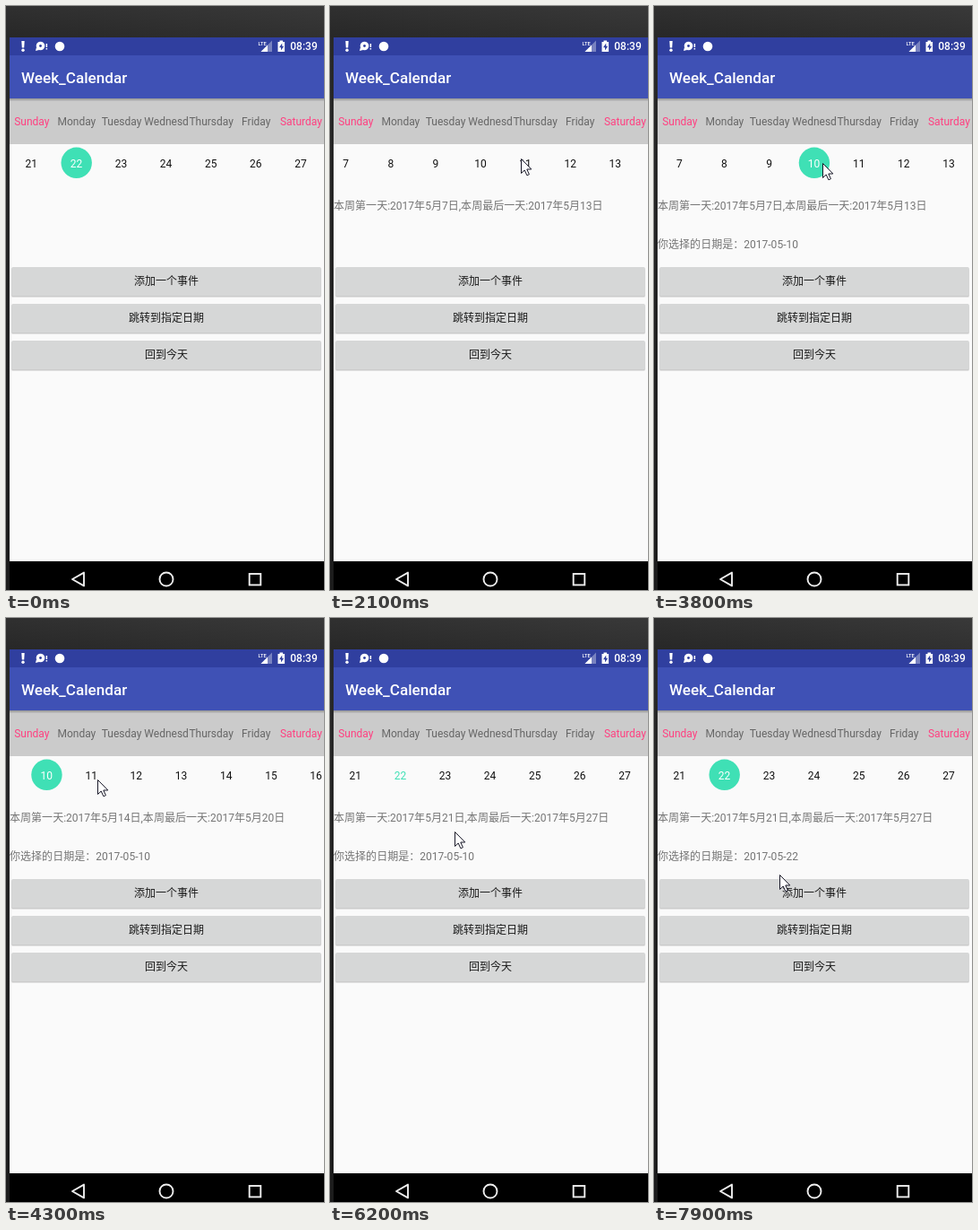
Animation of 355x651 px, one loop 8000 ms. Source, as an HTML page:

```html
<!DOCTYPE html>
<html lang="zh-CN">
<head>
<meta charset="utf-8">
<title>Week_Calendar</title>
<style>
  html, body { margin: 0; width: 100%; height: 100%; overflow: hidden; background: #2b2b2b; }
  svg { display: block; width: 355px; height: 651px; }
  text { font: 12px Roboto, "Noto Sans CJK SC", "Noto Sans CJK", sans-serif; }
  .mid { text-anchor: middle; }
  .bold { font-weight: 500; fill: #fff; }
  .note { fill: #757575; font-size: 12.04px; }
</style>
</head>
<body>
<svg viewBox="0 0 355 651" xmlns="http://www.w3.org/2000/svg">
  <defs>
    <linearGradient id="desk" x1="0" y1="1" x2="1" y2="0">
      <stop offset="0" stop-color="#272727"/><stop offset="1" stop-color="#393939"/>
    </linearGradient>
    <linearGradient id="side" x1="0" y1="0" x2="0" y2="1">
      <stop offset="0" stop-color="#292929"/><stop offset="1" stop-color="#1c1c1c"/>
    </linearGradient>
    <linearGradient id="drop" x1="0" y1="0" x2="0" y2="1">
      <stop offset="0" stop-opacity=".28"/><stop offset="1" stop-opacity="0"/>
    </linearGradient>
    <clipPath id="pane"><rect x="4" y="154" width="351" height="42"/></clipPath>
  </defs>

  <rect width="355" height="36" fill="url(#desk)"/>
  <rect y="35" width="4" height="616" fill="url(#side)"/>
  <rect x="4" y="103" width="351" height="516" fill="#fafafa"/>
  <rect x="4" y="35" width="351" height="20" fill="#303f9f"/>
  <rect x="4" y="55" width="351" height="48" fill="#3f51b5"/>
  <rect x="4" y="103" width="351" height="51" fill="#cbcbcb"/>
  <rect x="4" y="103" width="351" height="3.5" fill="url(#drop)"/>
  <rect x="4" y="619" width="351" height="32"/>

  <g fill="#fff">
    <path d="M17.3 39h3.4l-.5 7.5h-2.4z"/>
    <circle cx="19" cy="49.3" r="1.7"/>
    <circle cx="38.5" cy="44.5" r="4.8"/>
    <circle cx="38.5" cy="44.5" r="1.4" fill="#303f9f"/>
    <path d="M33 50l1-4 3 3zM44.6 42h1.5v4h-1.5zM44.6 47h1.5v1.5h-1.5z"/>
    <circle cx="60" cy="45" r="5.3"/>
    <path d="M297 38.5V51H284.5z" opacity=".35"/>
    <path d="M292 43.5V51H284.5z"/>
    <path d="M303.5 40h2v-1.5h3.6V40h2v11h-7.6z"/>
    <path d="M308.2 41.5l-3.2 4.7h2v3.3l3.2-4.7h-2z" fill="#303f9f"/>
  </g>
  <text x="281.5" y="44" class="bold" style="font-size:5.8px">LTE</text>
  <text x="317.3" y="49.4" class="bold">08:39</text>
  <text x="17" y="86" class="bold" style="font-size:17.1px">Week_Calendar</text>

  <g id="heads"></g>
  <g clip-path="url(#pane)"><g id="strip"></g></g>
  <text id="range" class="note" x="4" y="227"></text>
  <text id="picked" class="note" x="4" y="269.7"></text>
  <g id="buttons"></g>

  <g fill="none" stroke="#eee" stroke-width="1.9">
    <path d="M74 639L87 631.6V646.4z" stroke-linejoin="round"/>
    <circle cx="179" cy="639" r="7.5"/>
    <rect x="271.7" y="633" width="12.6" height="12.4"/>
  </g>
  <path id="cursor" d="M.5 .5V16.5L4.2 13L6.9 18.8L9.4 17.7L6.8 12H11.8z" fill="#fff" stroke="#181828"/>
</svg>

<script>
const LOOP = 8000, STEP = 100, PAGE = 351, COL = 50.1, TODAY = 22, TEAL = '#3fe0b5';
const $ = id => document.getElementById(id);
const colX = i => 28.5 + i * COL;

function add(parent, tag, attrs, text) {
  const el = document.createElementNS('http://www.w3.org/2000/svg', tag);
  for (const k in attrs) el.setAttribute(k, attrs[k]);
  if (text !== undefined) el.textContent = text;
  return parent.appendChild(el);
}

['Sunday', 'Monday', 'Tuesday', 'Wednesd', 'Thursday', 'Friday', 'Saturday'].forEach((name, i) =>
  add($('heads'), 'text', { x: colX(i) + .3, y: 133.4, class: 'mid', fill: i % 6 ? '#666' : '#ff4081' }, name));

// Three week pages side by side, from 7 to 27 May.
const days = Array.from({ length: 21 }, (_, k) => {
  const x = Math.floor(k / 7) * PAGE + colX(k % 7);
  return {
    n: k + 7,
    dot: add($('strip'), 'circle', { cx: x + .1, cy: 174.8, r: 17.2, fill: TEAL }),
    label: add($('strip'), 'text', { x: x - .2, y: 179.7, class: 'mid' }, k + 7)
  };
});

const buttons = ['添加一个事件', '跳转到指定日期', '回到今天'].map((name, i) => {
  const y = 291 + i * 41;
  const box = (dy, look) => add($('buttons'), 'rect', { x: 6.2, y: y + dy, width: 345.6, height: 32.3, rx: 1.7, ...look });
  box(1.8, { opacity: .1 });
  box(.8, { opacity: .12 });
  const face = box(0, { fill: '#d6d7d7' });
  add($('buttons'), 'text', { x: 179, y: y + 20.4, class: 'mid', fill: '#1b1b1b' }, name);
  return face;
});

// Pointer stops: arrival, x, y and, where it rests, departure
const stops = [
  [200, 110, 66], [600, 80, 172], [970, 175, 174, 1200], [1500, 105, 173],
  [2100, 213, 170], [2300, 230, 170, 2600], [2900, 172, 176, 3000], [3200, 180, 293],
  [3600, 188, 175, 3800], [4280, 100, 174], [5000, 163, 374], [5200, 171, 391, 5700],
  [6200, 139, 238], [6600, 171, 313], [7100, 73, 162, 7600], [7900, 140, 286]
];
const swipes = [
  { press: 600, release: 970, page: 1 },
  { press: 1500, release: 1840, page: 0 },
  { press: 3800, release: 4280, page: 1 }
];
const taps = [3000, 7600];
const SETTLE = 537, HOME = 5500;

function pointer(t) {
  const i = stops.findIndex(s => s[0] > t);
  if (i < 0) return stops[stops.length - 1].slice(1);
  const [t0, x0, y0, leave = t0] = stops[Math.max(0, i - 1)], [t1, x1, y1] = stops[i];
  const k = Math.max(0, (t - leave) / (t1 - leave));
  return [x0 + (x1 - x0) * k, y0 + (y1 - y0) * k];
}

function pageAt(t) {
  if (t > HOME) return 2;
  return swipes.reduce((page, s) => t >= s.release ? s.page : page, 2);
}

// The strip follows the pointer while pressed, then eases to its page.
function scroll(t) {
  if (t > HOME) return 2 * PAGE;
  return swipes.reduce((pos, { press, release, page }) => {
    if (t < press) return pos;
    const held = pos - pointer(Math.min(t, release))[0] + pointer(press)[0];
    const left = 1 - Math.min(1, Math.max(0, t - release) / SETTLE);
    const to = t < release ? held : page * PAGE;
    return to + (held - to) * left ** 5;
  }, 2 * PAGE);
}

function picked(t) {
  const tap = taps.filter(at => at <= t).pop();
  return tap && 7 + 7 * pageAt(tap) + Math.floor((pointer(tap)[0] - 4) / COL);
}

function draw(t) {
  const day = picked(t), week = 7 + 7 * pageAt(t);
  $('strip').setAttribute('transform', `translate(${-scroll(t)} 0)`);
  for (const d of days) {
    const on = d.n === (day || TODAY);
    d.dot.setAttribute('visibility', on ? 'visible' : 'hidden');
    d.label.setAttribute('fill', on ? '#fff' : d.n === TODAY ? TEAL : '#111');
  }
  $('range').textContent = t < swipes[0].release ? '' : `本周第一天:2017年5月${week}日,本周最后一天:2017年5月${week + 6}日`;
  $('picked').textContent = day ? `你选择的日期是：2017-05-${day}` : '';
  buttons[2].setAttribute('fill', t === HOME ? '#c6c7c7' : '#d6d7d7');
  const [x, y] = pointer(t).map(Math.round);
  $('cursor').setAttribute('visibility', t < stops[0][0] ? 'hidden' : 'visible');
  $('cursor').setAttribute('transform', `translate(${x} ${y})`);
}

let last = -1;
function tick(now) {
  const t = Math.floor(now % LOOP / STEP) * STEP;
  if (t !== last) draw(last = t);
  requestAnimationFrame(tick);
}
draw(0);
requestAnimationFrame(tick);
</script>
</body>
</html>
```
